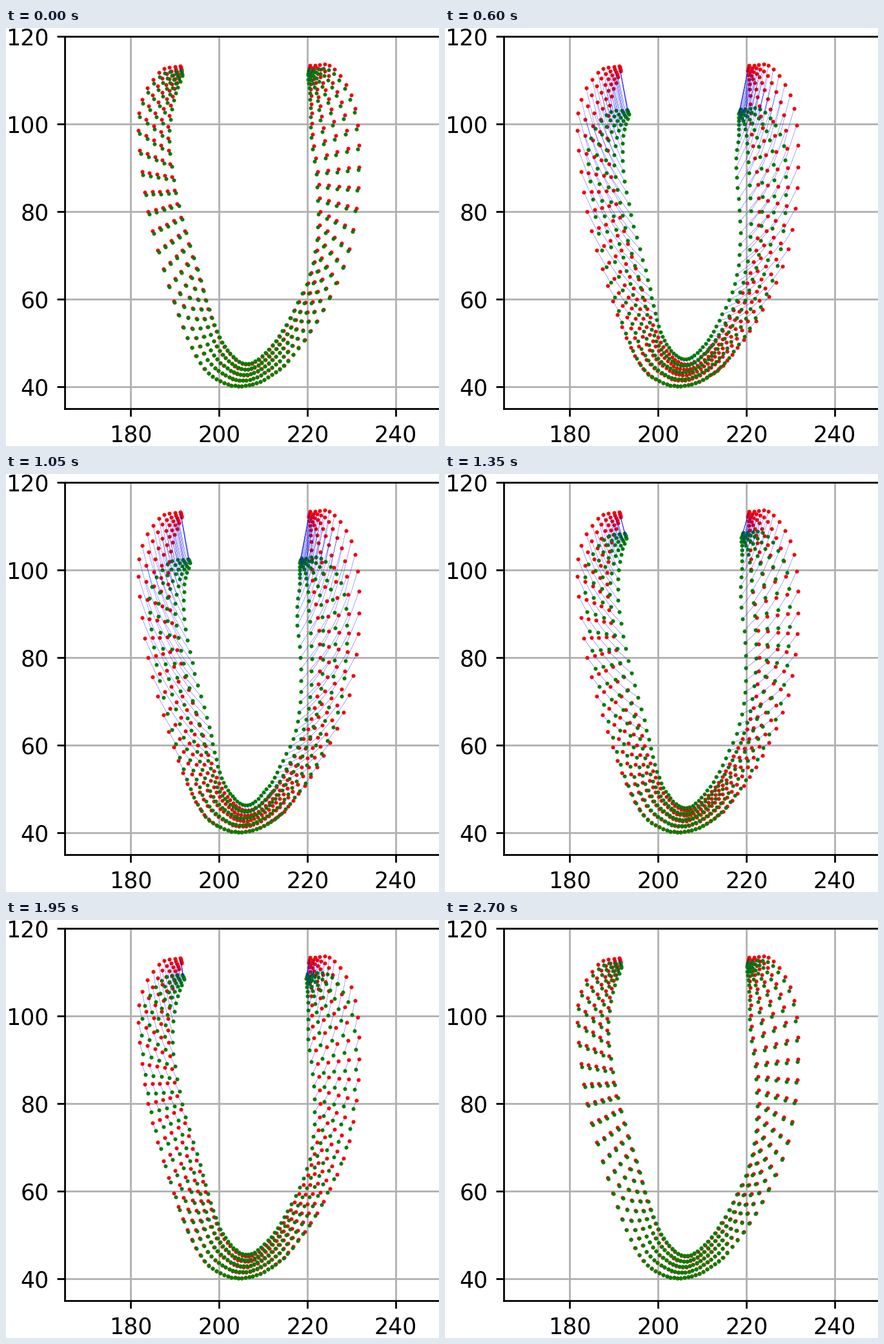
Write a matplotlib script that moves like this. It is 671 by 649 pixels and loops after 2850 ms.

```python
import numpy as np
import matplotlib.pyplot as plt
from matplotlib.animation import FuncAnimation
from matplotlib.collections import LineCollection

W, H, DPI = 671, 649, 250
LEFT, TOP, BOTTOM = 90.7, 13.0, 591.2
SCALE_X, SCALE_Y = 6.845, (BOTTOM - TOP) / 85
FRAMES, INTERVAL = 19, 150
COLUMNS, LAYERS = 74, 5
APEX_X, APEX_Y, BASE_Y = 367, 555, 59

# Key points of the resting wall: column, outer x, y, inner x, y in pixels
WALL = [
    (0, 270, 59, 272, 67), (4, 237, 69, 258, 106), (8, 206, 132, 251, 171),
    (12, 215, 255, 261, 252), (18, 260, 424, 295, 373),
    (24, 301, 520, 322, 461), (30, 338, 550.5, 347, 506),
    (36, 371, 555, 376, 522), (42, 406, 542, 408, 499),
    (48, 445, 507, 441, 450), (54, 502, 417, 478, 363),
    (57, 532, 343, 486, 306), (60, 546, 248, 485, 243),
    (64, 541, 125, 475, 165), (68, 509, 64, 473, 105), (73, 471, 58, 469, 66)]

# Key points of the heartbeat: time step, inward and downward strength
BEAT = [(0, .09, .105), (1, .19, .06), (4, 1, 1), (6, 1.06, 1.13),
        (7, 1.01, 1.07), (9, .7, .49), (11, .38, .4), (14, .26, .36),
        (18, .09, .1)]


def smooth(keys, count):
    """Cubic Hermite curve through the key points, sampled at 0..count-1."""
    keys = np.array(keys, float)
    t, points = keys[:, 0], keys[:, 1:]
    slope = np.gradient(points, t, axis=0)
    at = np.arange(count)
    k = np.clip(np.searchsorted(t, at, side="right") - 1, 0, len(t) - 2)
    span = (t[k + 1] - t[k])[:, None]
    u = (at - t[k])[:, None] / span
    return ((1 + 2 * u) * (1 - u) ** 2 * points[k]
            + u * (1 - u) ** 2 * span * slope[k]
            + u * u * (3 - 2 * u) * points[k + 1]
            + u * u * (u - 1) * span * slope[k + 1])


def contraction(points, depth):
    """Shift of each point at full strength: the base sinks, the sides close."""
    x, y = points.T
    height = np.clip((APEX_Y - y) / (APEX_Y - BASE_Y), 0, 1)
    side = np.tanh((APEX_X - x) / 20)
    bulge = np.sin(np.pi * height ** (1.15 + .15 * side))
    inward = side * (1.05 - .05 * side) * (12 * height + (11 + 9 * depth) * bulge)
    thickening = 11 * depth * np.exp(-(height / .33) ** 2)
    return np.column_stack([inward, 68 * height ** 1.15 - thickening])


def to_data(pixels):
    return np.column_stack([165 + (pixels[:, 0] - LEFT) / SCALE_X,
                            35 + (BOTTOM - pixels[:, 1]) / SCALE_Y])


wall = smooth(WALL, COLUMNS)
outer, inner = wall[:, :2], wall[:, 2:]
layers = np.linspace(0, 1, LAYERS)
rest = np.concatenate([outer + d * (inner - outer) for d in layers])
shift = contraction(rest, np.repeat(layers, COLUMNS))
rest_data = to_data(rest)
beat = smooth(BEAT, FRAMES)

fig = plt.figure(figsize=(W / DPI, H / DPI), dpi=DPI, facecolor="white")
ax = fig.add_axes([LEFT / W, 1 - BOTTOM / H, 1 - LEFT / W, (BOTTOM - TOP) / H])
ax.set_xlim(165, 165 + (W - LEFT) / SCALE_X)
ax.set_ylim(35, 120)
ax.set_xticks(range(180, 241, 20))
ax.set_yticks(range(40, 121, 20))
ax.tick_params(labelsize=10, labelfontfamily="DejaVu Sans")
ax.spines["right"].set_visible(False)
ax.grid(True)

ax.plot(*rest_data.T, "r.", markersize=1.5)
moving, = ax.plot([], [], "g.", markersize=1.5)
paths = LineCollection([], colors="b", linewidths=0.1, zorder=2.2)
ax.add_collection(paths, autolim=False)


def update(frame):
    now = to_data(rest + shift * beat[frame])
    moving.set_data(*now.T)
    paths.set_segments(np.stack([rest_data, now], axis=1))
    return moving, paths


anim = FuncAnimation(fig, update, frames=FRAMES, interval=INTERVAL,
                     repeat=True, repeat_delay=0)
plt.show()
```
